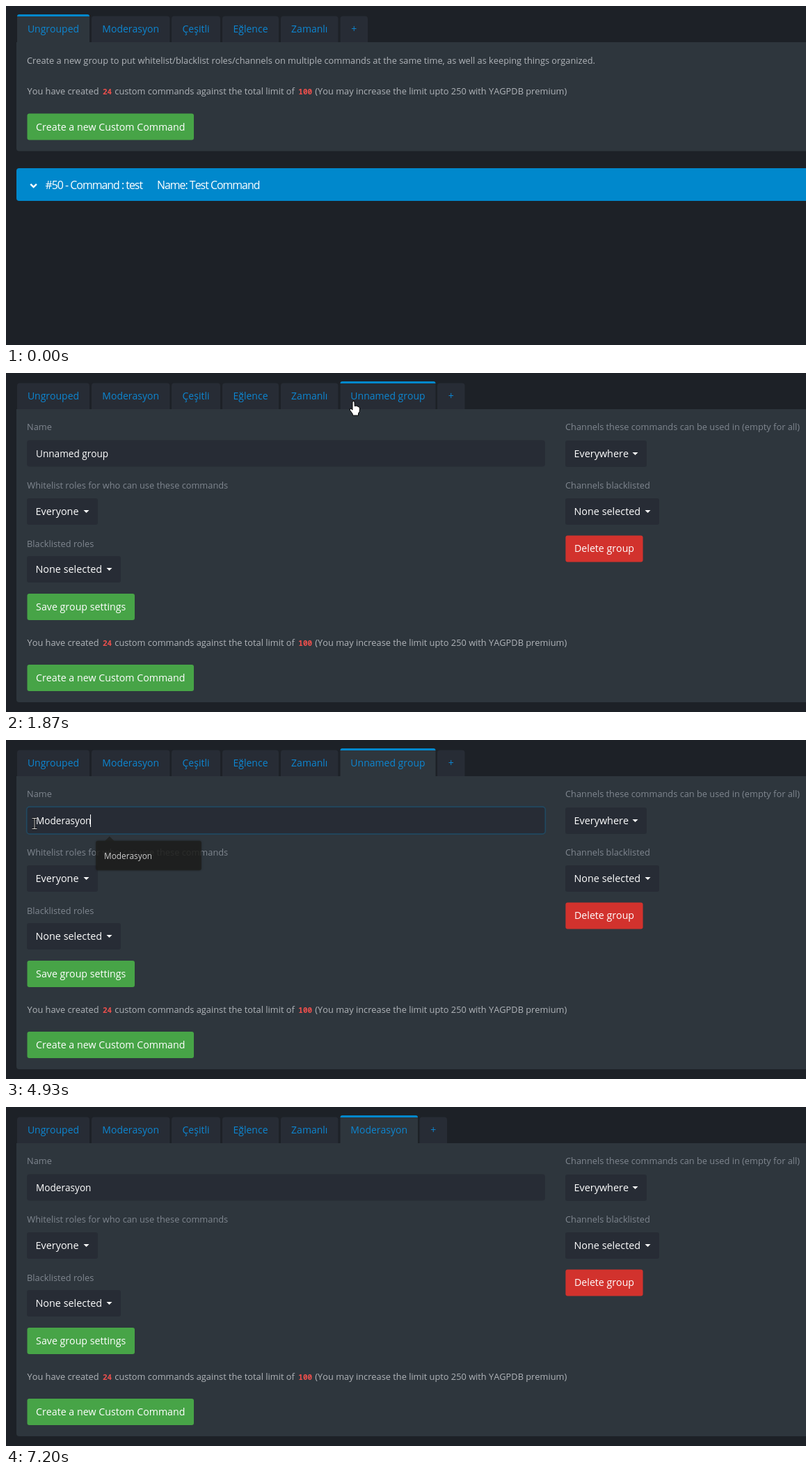
An HTML page with a canvas for the animation above (7.79 s loop, 1150 by 487 pixels).

```html
<!DOCTYPE html>
<html lang="en">
<head>
<meta charset="utf-8">
<title>Custom commands</title>
<style>
  html, body { margin: 0; width: 100%; height: 100%; overflow: hidden; background: #1d2127; }
  canvas { display: block; }
</style>
</head>
<body>
<canvas id="stage" width="1150" height="487"></canvas>
<script>
const ctx = document.getElementById('stage').getContext('2d');
ctx.fontKerning = 'none';
const LOOP = 7790, TICK = 1000 / 15;
const SANS = '"Open Sans", "Noto Sans", sans-serif';
const BODY = `12.8px ${SANS}`, TAB = `14px ${SANS}`, BUTTON = `14.2px ${SANS}`;
const DROP = `14.4px ${SANS}`, INPUT = `13.6px ${SANS}`, HEAD = `15.9px ${SANS}`;
const CODE = 'bold 11px "Noto Sans Mono", "DejaVu Sans Mono", monospace';
const C = {
  page: '#1d2127', panel: '#2e363d', field: '#272c35', blue: '#0088cc', link: '#0d86d1',
  green: '#47a447', red: '#d2322d', text: '#b0b4b9', label: '#7f868f', code: '#f0504d', white: '#fff'
};

const clamp = v => Math.max(0, Math.min(1, v));
const swing = v => 0.5 - Math.cos(Math.PI * clamp(v)) / 2;

function box(x, y, x2, y2, fill, radius = 3) {
  ctx.fillStyle = fill;
  ctx.beginPath();
  ctx.roundRect(x, y, x2 - x, y2 - y, radius);
  ctx.fill();
}

function text(str, x, y, font, fill, align = 'left') {
  ctx.font = font;
  ctx.fillStyle = fill;
  ctx.textAlign = align;
  ctx.fillText(str, x, y);
}

function shape(points, fill, stroke) {
  ctx.beginPath();
  points.forEach(([x, y]) => ctx.lineTo(x, y));
  ctx.closePath();
  if (fill) { ctx.fillStyle = fill; ctx.fill(); }
  if (stroke) { ctx.strokeStyle = stroke; ctx.lineWidth = 1; ctx.stroke(); }
}

function button(label, x, y, x2, fill) {
  box(x, y, x2, y + 38, fill);
  text(label, x + 12.6, Math.round(y + 24), BUTTON, C.white);
}

function dropdown(label, x, y, x2) {
  box(x, y, x2, y + 38, C.field);
  text(label, x + 12.5, y + 24, DROP, C.white);
  const cx = x2 - 16.5, cy = y + 17;
  shape([[cx - 4, cy], [cx + 4, cy], [cx, cy + 4]], C.white);
}

function tab(label, x, x2, on, fill = on ? C.panel : C.field) {
  box(x, on ? 12 : 14.5, x2, 52, fill, [4, 4, 0, 0]);
  if (on) box(x, 12, x2, 15, C.blue, [4, 4, 0, 0]);
  text(label, (x + x2) / 2, 38, TAB, C.link, 'center');
}

function tabs(extra, extraEnd, hover) {
  tab('Ungrouped', 16, 120, !extra);
  tab('Moderasyon', 123, 235.5);
  tab('Çeşitli', 238, 308);
  tab('Eğlence', 311, 392);
  tab('Zamanlı', 395, 477.5);
  if (extra) tab(extra, 480.5, extraEnd, true, hover ? C.field : C.panel);
  const x = extra ? extraEnd + 2.5 : 480.5;
  tab('+', x, x + 39.5, hover && !extra);
}

function quota(y) {
  text('You have created', 30.5, y, BODY, C.text);
  text('24', 139, y, CODE, C.code);
  text('custom commands against the total limit of', 156.3, y, BODY, C.text);
  text('100', 420.3, y, CODE, C.code);
  text('(You may increase the limit upto 250 with YAGPDB premium)', 444.3, y, BODY, C.text);
}

function listPage(hover) {
  box(15, 52, 1160, 208.5, C.panel, [0, 0, 0, 4]);
  tabs('', 0, hover);
  text('Create a new group to put whitelist/blacklist roles/channels on multiple commands at the same time, as well as keeping things organized.',
    30, 83, BODY, C.text);
  quota(127);
  button('Create a new Custom Command', 30.5, 154.5, 270, C.green);

  box(15, 233, 1160, 280, C.blue, 4);
  ctx.strokeStyle = C.white;
  ctx.lineWidth = 2.4;
  ctx.beginPath();
  ctx.moveTo(35.3, 255.8);
  ctx.lineTo(39.6, 260);
  ctx.lineTo(43.9, 255.8);
  ctx.stroke();
  ctx.letterSpacing = '-1px';
  text('#50 - Command : test', 56.5, 263, HEAD, C.white);
  text('Name: Test Command', 217, 263, HEAD, C.white);
  ctx.letterSpacing = '0px';
}

const WORD = 'Moderasyon';
const KEYS = [3660, 3790, 3925, 4060, 4260, 4325, 4395, 4725, 4795, 4860];

function nameField(t, mouse) {
  const focus = t > 2460 && t < 5460;
  const typed = KEYS.filter(k => t >= k).length;
  const value = typed ? WORD.slice(0, typed) : 'Unnamed group';

  ctx.save();
  if (focus) {
    ctx.shadowColor = 'rgba(0,136,204,.3)';
    ctx.shadowBlur = 3;
  }
  box(30, 96.5, 775, 134.5, C.field, 4);
  ctx.restore();
  if (focus) {
    ctx.strokeStyle = 'rgba(0,136,204,.22)';
    ctx.lineWidth = 1.5;
    ctx.beginPath();
    ctx.roundRect(30, 96, 745, 39, 4);
    ctx.stroke();
  }
  ctx.font = INPUT;
  const end = 43 + ctx.measureText(value).width;
  if (focus && !typed && mouse.x < end) {
    let from = 43;
    for (let i = 1; i <= value.length; i++) {
      const edge = 43 + ctx.measureText(value.slice(0, i)).width;
      if (edge < mouse.x + 2) from = edge;
    }
    box(from, 106, end, 125, '#3390ff', 0);
  }
  text(value, 43, 121, INPUT, C.white);
  if (focus && typed && t < 5390) box(Math.round(end) - 1, 107, Math.round(end), 125, C.white, 0);
}

function suggestion(t) {
  const alpha = t < 3660 ? 0 : 1 - clamp((t - 4890) / 190);
  if (!alpha) return;
  const zoom = t < 4890 ? 1 : 0.985;
  ctx.save();
  ctx.globalAlpha = alpha;
  ctx.translate(205, 166);
  ctx.scale(zoom, zoom);
  ctx.translate(-205, -166);
  ctx.shadowColor = 'rgba(0,0,0,.4)';
  ctx.shadowBlur = 3;
  box(128, 144.5, 282, 187.5, '#1f1f1c');
  ctx.shadowBlur = 0;
  shape([[141, 145], [148, 138], [155, 145]], '#1f1f1c');
  text(WORD, 140, 171, `12px ${SANS}`, C.white);
  ctx.restore();
}

function formPage(t, mouse) {
  const saved = t > 5725;
  box(15, 52, 1160, 473, C.panel, [0, 0, 0, 4]);
  tabs(saved ? WORD : 'Unnamed group', saved ? 592 : 617.5, mouse.y < 52);

  text('Name', 30, 82, BODY, C.label);
  nameField(t, mouse);
  text('Whitelist roles for who can use these commands', 30.3, 166, BODY, C.label);
  dropdown('Everyone', 30, 180, 132);
  text('Blacklisted roles', 30, 250, BODY, C.label);
  dropdown('None selected', 30, 263, 165);
  button('Save group settings', 30.5, 317, 185, C.green);
  quota(392);
  button('Create a new Custom Command', 30.5, 419, 270, C.green);

  text('Channels these commands can be used in (empty for all)', 804, 82, BODY, C.label);
  dropdown('Everywhere', 804, 97, 921);
  text('Channels blacklisted', 804, 166, BODY, C.label);
  dropdown('None selected', 804, 180, 939);
  button('Delete group', 804.4, 233.4, 915.6, C.red);
  suggestion(t);
}

function loader(alpha, t) {
  ctx.save();
  ctx.globalAlpha = alpha;
  box(0, 0, 1150, 487, C.panel, 0);
  const turn = (-125 + (t - 5667) * 0.18) * Math.PI / 180;
  ctx.lineWidth = 11;
  [['#272b36', 0, 2 * Math.PI], ['#020304', turn - Math.PI / 4, turn + Math.PI / 4]].forEach(([color, a, b]) => {
    ctx.strokeStyle = color;
    ctx.beginPath();
    ctx.arc(642, 390.5, 43.5, a, b);
    ctx.stroke();
  });
  ctx.restore();
}

// Pointer stops: time, x, y
const PATH = [
  [400, 459, 424], [720, 490, 290], [930, 531, 130], [1200, 497.5, 39.5], [2000, 497.5, 39.5],
  [2333, 305.5, 123], [2400, 305.5, 123], [2933, 38.5, 119], [6000, 38.5, 119],
  [6400, 411.5, 247.5], [7000, 411.5, 247.5], [7133, 386.5, 369]
];

function pointer(t) {
  const last = PATH.length - 1;
  const next = PATH.findIndex(p => p[0] >= t);
  const i = next < 0 ? last : Math.max(1, next);
  const [a, b] = [PATH[i - 1], PATH[i]];
  const raw = clamp((t - a[0]) / (b[0] - a[0]));
  const k = t < 1200 ? raw : swing(raw);
  return { x: a[1] + (b[1] - a[1]) * k, y: a[2] + (b[2] - a[2]) * k };
}

function drawArrow() {
  shape([[0, 0], [0, 16.5], [3.8, 13], [6.2, 18.6], [8.8, 17.5], [6.4, 12], [11.5, 11.7]], C.white, '#000');
}

function drawHand() {
  shape([[0.5, 2], [2, 1], [3.5, 2], [3.7, 8], [6, 7.6], [8.3, 8.6], [10.4, 9.6], [11, 11.5],
    [10.6, 16], [9, 18.5], [9, 21.5], [1, 21.5], [0.6, 19], [-3, 14], [-3.3, 12], [-1.5, 11.7], [0.5, 13.6]],
  C.white, '#000');
}

function drawBeam() {
  const beam = () => {
    ctx.beginPath();
    ctx.moveTo(-3.5, -7.5); ctx.lineTo(3.5, -7.5);
    ctx.moveTo(0, -7.5); ctx.lineTo(0, 7.5);
    ctx.moveTo(-3.5, 7.5); ctx.lineTo(3.5, 7.5);
    ctx.stroke();
  };
  ctx.translate(2.5, 1);
  ctx.strokeStyle = '#000';
  ctx.lineWidth = 2.4;
  beam();
  ctx.strokeStyle = '#ddd';
  ctx.lineWidth = 1;
  beam();
}

function drawPointer(p, form, busy) {
  const inField = p.y > 96 && p.y < 135 && p.x > 30 && p.x < 775;
  ctx.save();
  ctx.translate(p.x, p.y);
  if (form && !busy && p.y < 52) drawHand();
  else if (form && !busy && inField) drawBeam();
  else drawArrow();
  ctx.restore();
}

function draw(t) {
  const form = t > 1860;
  const mouse = pointer(t);
  const shown = t > 395 && t < 7190;
  const fade = form ? (t < 5725 ? swing((t - 5405) / 400) : 0) : swing((t - 1430) / 400);

  box(0, 0, 1150, 487, C.page, 0);
  if (form) formPage(t, mouse);
  else listPage(shown && mouse.y < 52 && mouse.x > 480 && mouse.x < 520);
  if (fade > 0) loader(fade, t);
  if (shown) drawPointer(mouse, form, fade > 0);
}

function frame() {
  const t = performance.now() % LOOP;
  draw(Math.floor((t + 4) / TICK) * TICK);
  requestAnimationFrame(frame);
}
frame();
</script>
</body>
</html>
```
